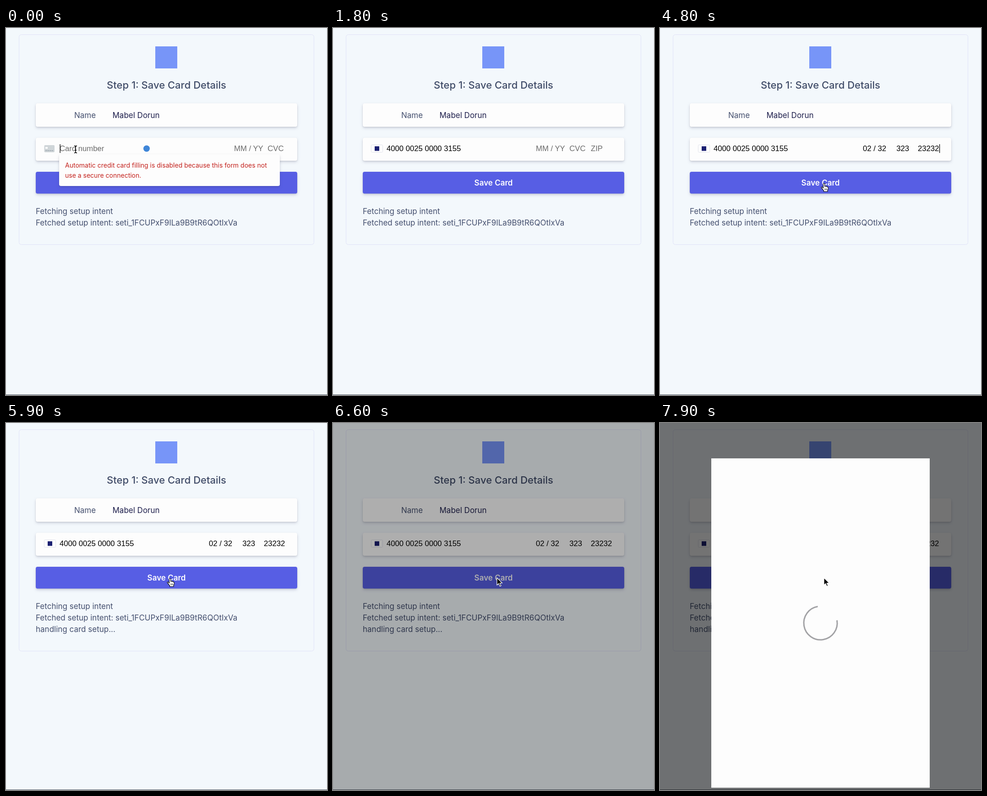
Recreate the animation shown at these times as an HTML page. Size 701x799 px, loop 8 s.

```html
<!DOCTYPE html>
<html lang="en">
<head>
<meta charset="utf-8">
<title>Save card</title>
<style>
  html, body { margin: 0; width: 100%; height: 100%; overflow: hidden; background: #f3f8fc; }
  svg { display: block; width: 100%; height: 100%; }
  text { font: 17px Inter, sans-serif; fill: #45506f; white-space: pre; }
  .box { fill: #fdfdfd; filter: drop-shadow(0 3px 3px #32325d2b) drop-shadow(0 1px 1px #0000001a); }
  .card text { font: 16.7px "Liberation Sans", Arial, sans-serif; fill: #000; }
  .card text.hint { fill: #6b6b6b; }
  .popup text { font-size: 14px; fill: #c3211c; }
</style>
</head>
<body>
<svg viewBox="0 0 701 799">
  <rect width="701" height="799" fill="#f3f8fc"/>
  <rect id="frame" x="28.5" y="14.5" width="644" height="457" rx="5" fill="none" stroke="#e0e2f8"/>
  <rect x="326" y="40" width="48" height="48" fill="#7795f8"/>
  <text x="350.5" y="132" text-anchor="middle" style="font-size:22px;font-weight:500;fill:#404c68">Step 1: Save Card Details</text>

  <rect class="box" x="65" y="164" width="571" height="51" rx="4"/>
  <text x="149" y="196">Name</text>
  <text x="232.5" y="196" style="fill:#20214e">Mabel Dorun</text>

  <rect class="box" x="65" y="239" width="571" height="50" rx="4"/>
  <g id="plainIcon">
    <rect x="83.5" y="255" width="22.5" height="15.5" rx="2" fill="#cfd5d8"/>
    <rect x="86" y="259" width="5" height="4" rx="1" fill="#fff"/>
    <path d="M86 267h18" stroke="#9aa5ad" stroke-width="1.5" stroke-dasharray="3.5 1"/>
  </g>
  <g id="brandIcon">
    <rect x="83.5" y="254.5" width="25" height="16" rx="2" fill="#fff" stroke="#dfe1ea"/>
    <rect x="91" y="257.5" width="10" height="10" fill="#1a1f71"/>
  </g>
  <g class="card">
    <text id="number" y="268"></text>
    <text id="expiry" y="268"></text>
    <text id="cvc" y="268"></text>
    <text id="zip" y="268"></text>
    <rect id="caret" y="253" width="1.3" height="19"/>
  </g>

  <rect class="box" x="65" y="313" width="571" height="47.5" rx="4" style="fill:#575ee4"/>
  <text x="350.5" y="343" text-anchor="middle" style="font-weight:600;fill:#fff">Save Card</text>

  <text x="65" y="405">Fetching setup intent</text>
  <text x="65" y="430">Fetched setup intent: seti_1FCUPxF9ILa9B9tR6QOtIxVa</text>
  <text id="handling" x="65" y="455">handling card setup...</text>

  <g id="popup" class="popup">
    <circle cx="307" cy="262.5" r="7" fill="#3f86d8"/>
    <rect class="box" x="116" y="275" width="482" height="69" rx="4"/>
    <text x="129" y="304">Automatic credit card filling is disabled because this form does not</text>
    <text x="129" y="326">use a secure connection.</text>
  </g>
  <path d="M0 798.5H701" stroke="#4d5562"/>

  <rect id="shade" width="701" height="799"/>
  <g id="modal">
    <rect x="-238.5" y="-358.5" width="477" height="717" fill="#fdfdfd"/>
    <circle id="spinner" r="36.5" fill="none" stroke="#a2a2a5" stroke-width="3" pathLength="4" stroke-dasharray="3 1"/>
  </g>

  <g id="mouse" stroke-linejoin="round">
    <path id="beam" d="M-3-7.5q3 0 3 2.500V5.500q0 2.500-3 2.500M3-7.500q-3 0-3 2.500M3 8q-3 0-3-2.500M-2 2h4" fill="none" stroke="#000" stroke-width="1.400"/>
    <path id="arrow" d="M0-1v16l3.700-3.500 2.700 6 2.600-1.100-2.700-5.900h5.200z" fill="#000" stroke="#fff" stroke-width="1.200"/>
    <g id="hand" fill="#fff" stroke="#000" stroke-width="1.100">
      <path d="M-1.500 1.500Q-1.500 0 0 0T1.700 1.500V7q.3-1 1.600-1 1.300.1 1.500 1.400.6-.9 1.700-.5 1 .3 1.100 1.500 1.900-.5 1.900 1.700 0 3-1.500 5.400V18H-.5v-2.200Q-3.500 13-5.700 9.400-6 7.800-4.400 8q1.500.5 2.900 2.600z"/>
      <path d="M2 11.500V15M4.200 11.500V15M6.400 11.500V15" stroke-width=".8"/>
    </g>
  </g>
</svg>
<script>
const el = Object.fromEntries([...document.querySelectorAll('[id]')].map(n => [n.id, n]));
const LOOP = 8000, FONT_SIZE = 16.7;
const NUMBER_START = 100, NUMBER_STEP = 78, DETAIL_START = 1920, DETAIL_STEP = 155;
const NUMBER = '4000002500003155', DETAILS = '023232323232';
const NUMBER_END = NUMBER_START + NUMBER_STEP * (NUMBER.length - 1);
const CLICK = 5150, LOGGED = 5300, SHADE_START = 6370;

const clamp = v => Math.max(0, Math.min(1, v));
const progress = (t, start, length) => clamp((t - start) / length);
const easeInOut = p => p * p * (3 - 2 * p);
const keysAt = (t, start, step, count) => Math.max(0, Math.min(count, Math.floor((t - start) / step) + 1));
const show = (node, visible) => node.setAttribute('visibility', visible ? 'visible' : 'hidden');
const textWidth = s => [...s].reduce((w, c) => w + (/\d/.test(c) ? 0.556 : 0.278), 0) * FONT_SIZE;

function field(node, x, value, hint) {
  node.setAttribute('x', x);
  node.textContent = value || hint;
  node.classList.toggle('hint', !value);
  return x + textWidth(value);
}

function drawCard(t) {
  const typed = keysAt(t, NUMBER_START, NUMBER_STEP, NUMBER.length);
  const details = keysAt(t, DETAIL_START, DETAIL_STEP, DETAILS.length);
  const number = NUMBER.slice(0, typed).replace(/(\d{4})(?=\d)/g, '$1 ');
  const digits = DETAILS.slice(0, Math.min(details, 4));
  const expiry = digits.length < 2 ? digits : digits.slice(0, 2) + ' / ' + digits.slice(2);
  const slide = easeInOut(progress(t, NUMBER_END, 380));
  const shift = 55 * (1 - slide);

  const ends = [
    field(el.number, 117, number, 'Card number'),
    field(el.expiry, 443 + shift, expiry, 'MM / YY'),
    field(el.cvc, 516.3 + shift, DETAILS.slice(4, Math.min(details, 7)), 'CVC'),
    field(el.zip, 563 + shift, DETAILS.slice(7, details), 'ZIP')
  ];
  el.zip.setAttribute('opacity', slide);

  const focus = typed < NUMBER.length ? 0 : details < 4 ? 1 : details < 7 ? 2 : 3;
  const lastKey = details ? DETAIL_START + DETAIL_STEP * (details - 1)
    : typed ? NUMBER_START + NUMBER_STEP * (typed - 1) : 0;
  el.caret.setAttribute('x', ends[focus] + 0.5);
  show(el.caret, t < CLICK && Math.floor((t - lastKey) / 500) % 2 === 0);

  const branded = typed > 0 && focus !== 2;
  show(el.brandIcon, branded);
  show(el.plainIcon, !branded);
  show(el.popup, !typed);
}

function drawMouse(t) {
  const p = easeInOut(progress(t, 3850, 750));
  const x = 152 + 206 * p, y = 264 + 74 * p;
  const visible = t < NUMBER_START || t >= 3850;
  const shape = t >= SHADE_START - 70 ? 'arrow' : y < 289 ? 'beam' : y < 313 ? 'arrow' : 'hand';
  el.mouse.setAttribute('transform', `translate(${x} ${y})`);
  for (const name of ['beam', 'arrow', 'hand']) show(el[name], visible && shape === name);
}

function drawModal(t) {
  const p = progress(t, 7000, 500);
  const rest = (1 - p) ** 4;
  el.shade.setAttribute('opacity', 0.545 * progress(t, SHADE_START, 400));
  el.modal.setAttribute('opacity', p);
  el.modal.setAttribute('transform', `translate(350.5 ${435.5 + 20 * rest}) scale(${1 - 0.05 * rest})`);
  el.spinner.setAttribute('transform', `rotate(${(t - 7900) / 2 - 10})`);
}

function draw(now) {
  const t = now % LOOP;
  const logged = t >= LOGGED;
  show(el.handling, logged);
  el.frame.setAttribute('height', logged ? 482 : 457);
  drawCard(t);
  drawMouse(t);
  drawModal(t);
}

const start = performance.now();
function tick() {
  draw(performance.now() - start);
  requestAnimationFrame(tick);
}
tick();
</script>
</body>
</html>
```
